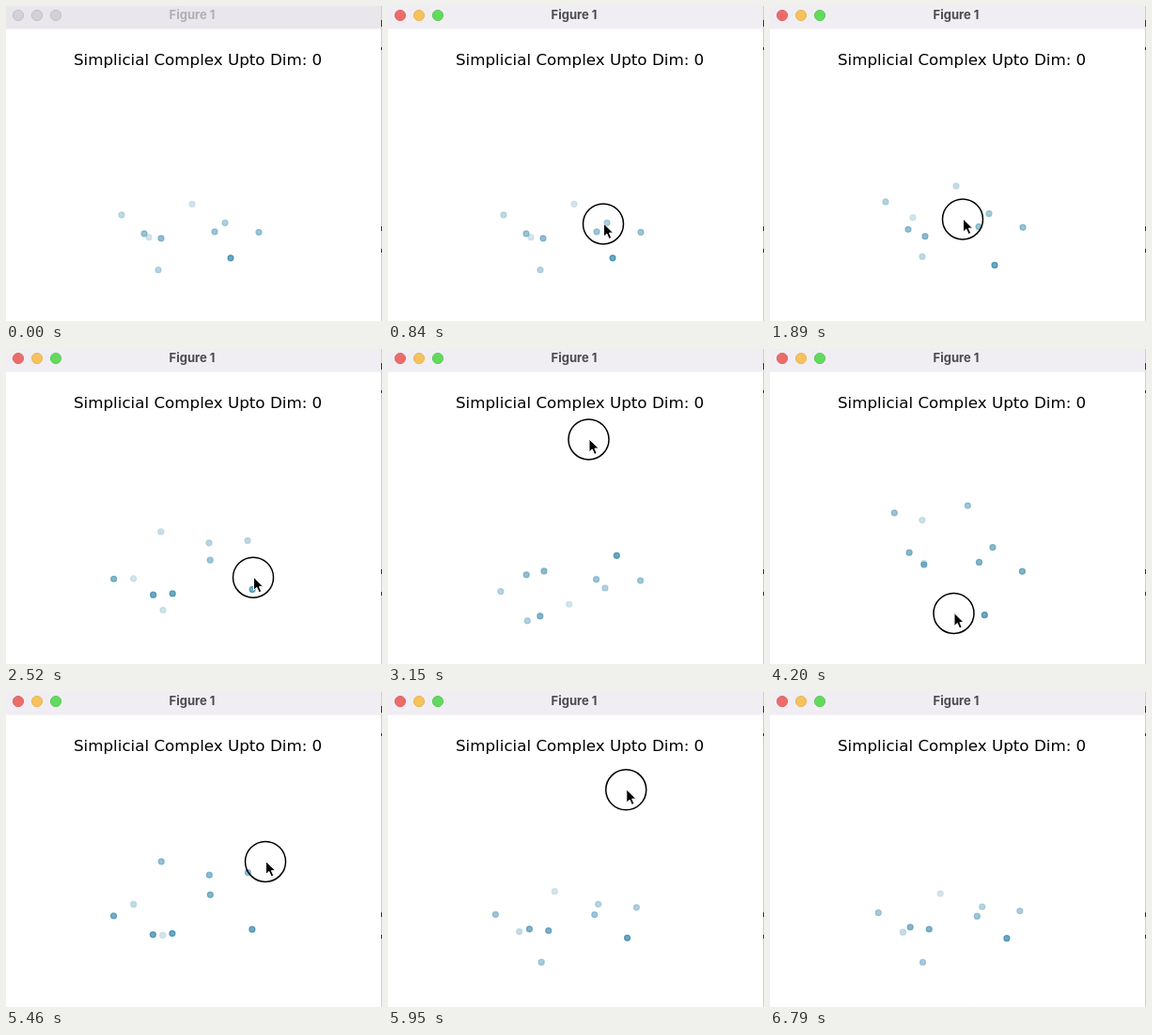
An HTML page for the animation above (7770 ms loop, 400 by 336 pixels).

```html
<!DOCTYPE html>
<html lang="en">
<head>
<meta charset="utf-8">
<title>Figure 1</title>
<style>
  html, body { margin: 0; width: 100%; height: 100%; overflow: hidden; background: #fff; }
  svg { display: block; width: 400px; height: 336px; }
  .bar { fill: #e9e7eb; }
  .name { font: 700 13px Inter, sans-serif; fill: #b1afb3; text-anchor: middle; }
  .light { fill: #d3d1d5; stroke: #c3c1c5; }
  .active .bar { fill: #f0eef3; }
  .active .name { fill: #4b4a4d; }
  .active .red { fill: #ec6c6a; stroke: #de6866; }
  .active .amber { fill: #f5c25c; stroke: #e8b658; }
  .active .green { fill: #63da5e; stroke: #5ecb59; }
  .title { font: 16.72px "DejaVu Sans", sans-serif; }
  .dots circle { fill: #1f7a9f; stroke: #1f7a9f; stroke-width: 1.2; }
  .ring { fill: none; stroke: #000; stroke-width: 1.5; }
  .arrow { stroke: #fff; stroke-width: 1; }
</style>
</head>
<body>
<svg id="win" viewBox="0 0 400 336">
  <rect class="bar" width="400" height="24.5"/>
  <circle class="light red" cx="13" cy="10" r="5.6"/>
  <circle class="light amber" cx="33" cy="10" r="5.6"/>
  <circle class="light green" cx="53" cy="10" r="5.6"/>
  <text class="name" x="198" y="14">Figure 1</text>
  <path d="M399.5 0V336" stroke="#cfcdd1"/>
  <path d="M399.5 15V22M399.5 44V47M399.5 235V240M399.5 259V263" stroke="#333"/>
  <text class="title" x="72" y="63">Simplicial Complex Upto Dim: 0</text>
  <g class="dots" id="dots"></g>
  <g id="mouse">
    <circle class="ring" id="ring" cy=".4" r="21.5"/>
    <path class="arrow" d="M.5 0V14L3.8 11L6.2 16.4L8.7 15.3L6.4 10.1H10.6Z"/>
  </g>
</svg>
<script>
const LOOP = 7770, STEP = 70;
const CX = 206, CY = 222;         // pivot of the scene
const FLOOR = -24;                // height of the plane most points lie on
const START_TILT = 30;
const DEG_PER_PX = 0.573;
const $ = id => document.getElementById(id);

// across, away, height above the floor
const cloud = [
  [-83, 40], [-59, 0], [-54, 46, -31], [-41, -10], [-8, 63],
  [16, 4], [27, 23], [63, 3], [33, -52], [-44, 4, -47]
].map(([x, z, h = 0]) => ({ x, z, h: FLOOR + h }));

// Key stops of the pointer: time, x, y
const stops = [
  [490, 412, 270], [770, 229, 232], [980, 229, 232], [1260, 205, 197], [1470, 205, 197],
  [1890, 205, 227], [2170, 203, 314], [2660, 287, 215], [3150, 213.5, 96],
  [3360, 211, 81], [3430, 221, 87], [4200, 195.5, 281.5], [4550, 200, 284],
  [4690, 200, 284], [4830, 232, 220], [4970, 204, 182], [5180, 204, 182],
  [5460, 276, 180.5], [6020, 250, 93], [6230, 246.5, 98.5], [6370, 242, 94], [6790, 212, 335]
];

const click = [770, 1050];
const drags = [[1470, 3360], [3430, 4550], [5180, 6230]];

function pointer(t) {
  const n = stops.findIndex(s => s[0] > t);
  const [t1, x1, y1] = stops.at(n);
  if (n <= 0) return { x: x1, y: y1 };
  const [t0, x0, y0] = stops[n - 1], k = (t - t0) / (t1 - t0);
  return { x: x0 + (x1 - x0) * k, y: y0 + (y1 - y0) * k };
}

// Every drag so far adds its travel to the viewing angles.
function camera(t) {
  let turn = 0, tilt = START_TILT;
  for (const [from, to] of drags) {
    if (t < from) break;
    const a = pointer(from), b = pointer(Math.min(t, to));
    turn += (b.x - a.x) * DEG_PER_PX;
    tilt += (b.y - a.y) * DEG_PER_PX;
  }
  return [turn, tilt].map(deg => deg * Math.PI / 180);
}

function project({ x, z, h }, turn, tilt) {
  const back = z * Math.cos(turn) + x * Math.sin(turn);
  return {
    x: CX + x * Math.cos(turn) - z * Math.sin(turn),
    y: CY - h * Math.cos(tilt) - back * Math.sin(tilt),
    depth: back * Math.cos(tilt) - h * Math.sin(tilt)
  };
}

const dots = cloud.map(() => {
  const c = document.createElementNS('http://www.w3.org/2000/svg', 'circle');
  c.setAttribute('r', 3);
  return $('dots').appendChild(c);
});

function drawDots(t) {
  const [turn, tilt] = camera(t);
  const spots = cloud.map(p => project(p, turn, tilt));
  const depths = spots.map(p => p.depth);
  const near = Math.min(...depths), far = Math.max(...depths);
  spots.forEach((p, i) => {
    dots[i].setAttribute('cx', p.x);
    dots[i].setAttribute('cy', p.y);
    dots[i].setAttribute('opacity', 1 - 0.7 * (p.depth - near) / (far - near));
    dots[i].setAttribute('fill-opacity', 0.65);
    dots[i].setAttribute('stroke-opacity', 0.65);
  });
}

function draw(now) {
  const t = Math.floor((now % LOOP) / STEP) * STEP;
  const { x, y } = pointer(t);
  const pressed = [click, ...drags].some(([a, b]) => t >= a && t <= b);
  $('win').classList.toggle('active', t >= click[0]);
  $('mouse').setAttribute('transform', `translate(${x} ${y})`);
  $('mouse').setAttribute('visibility', t < 560 ? 'hidden' : 'visible');
  $('ring').setAttribute('opacity', pressed ? 1 : 0);
  drawDots(t);
}

const start = performance.now();
function tick() {
  draw(performance.now() - start);
  requestAnimationFrame(tick);
}
tick();
</script>
</body>
</html>
```
